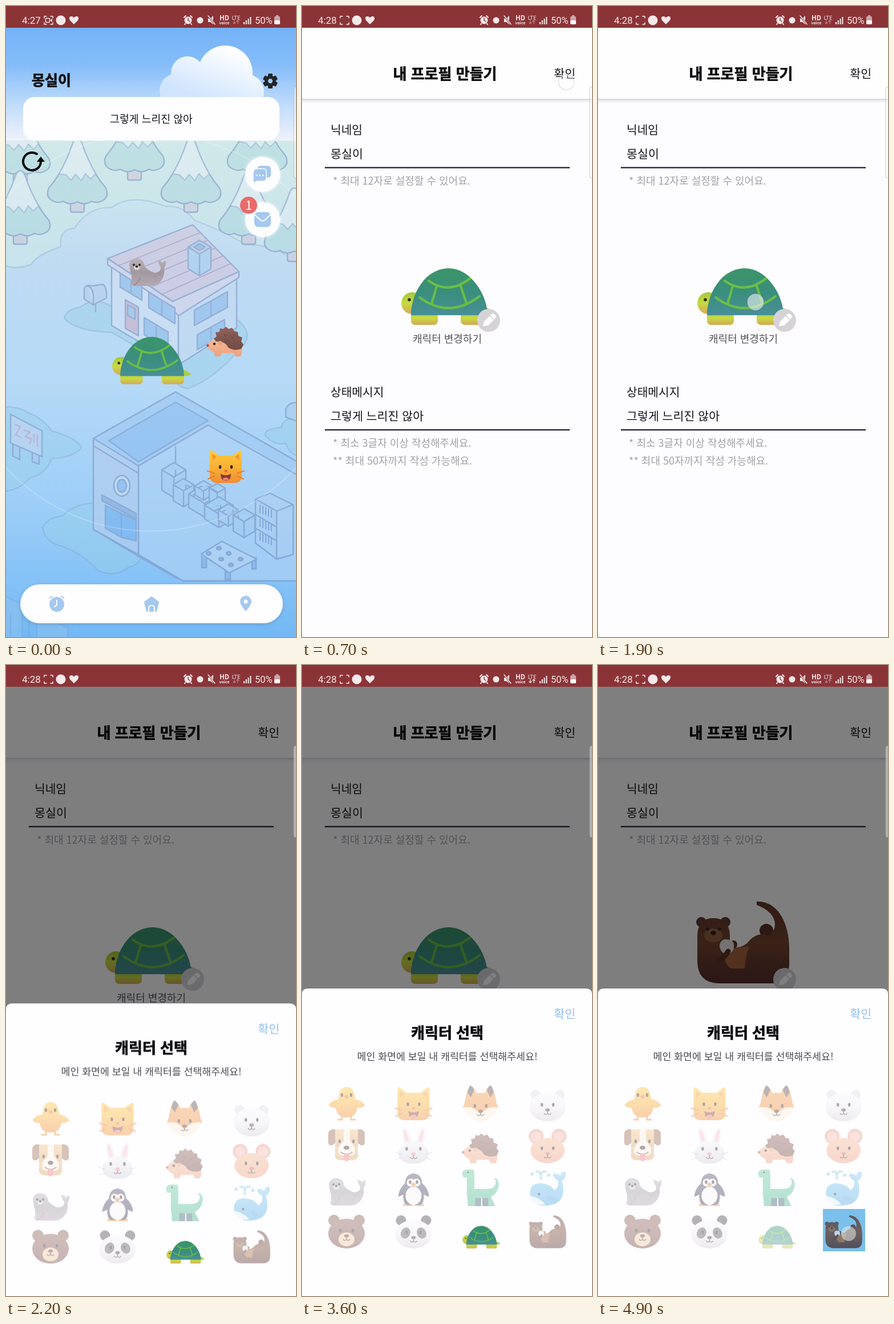
These frames come from a looping animation (508x1102 px, 5 s). An HTML page:

```html
<!DOCTYPE html>
<html lang="ko">
<head>
<meta charset="utf-8">
<style>
html,body{margin:0;width:100%;height:100%;overflow:hidden;background:#fdfcfe}
svg{display:block;width:508px;height:1102px;font-family:'Noto Sans CJK KR','Noto Sans CJK',sans-serif}
.step{animation:5s step-end infinite}
.home{animation-name:home}
.before{animation-name:before}
.after{animation-name:after}
.old{animation-name:old}
.new{animation-name:new}
.faded{animation-name:faded}
.net{animation-name:net}
.tap1{animation:tap1 5s linear infinite}
.tap2{animation:tap2 5s linear infinite}
.dim{animation:dim 5s linear infinite}
.sheet{animation:sheet 5s infinite}
@keyframes home{0%{opacity:1}14%,to{opacity:0}}
@keyframes before{0%{opacity:1}4%,to{opacity:0}}
@keyframes after{0%{opacity:0}4%,to{opacity:1}}
@keyframes old{0%{opacity:1}98%,to{opacity:0}}
@keyframes new{0%{opacity:0}98%,to{opacity:1}}
@keyframes faded{0%{opacity:1}98%,to{opacity:.4}}
@keyframes net{0%{opacity:.4}68%{opacity:1}76%,to{opacity:.4}}
@keyframes tap1{0%,9%{opacity:0}10%,12%{opacity:1}14%{opacity:.6}16%,to{opacity:0}}
@keyframes tap2{0%,35%{opacity:0}36%,38%{opacity:1}42%,to{opacity:0}}
@keyframes dim{0%,41%{opacity:0}44%,to{opacity:1}}
@keyframes sheet{0%,41%{transform:translateY(540px);animation-timing-function:cubic-bezier(.2,.7,.3,1)}46%,to{transform:none}}
</style>
</head>
<body>
<svg id="stage" viewBox="0 0 508 1102"></svg>
<script>
const path = (d, fill = 'none', more = '') => `<path d="${d}" fill="${fill}" ${more}/>`;
const oval = (x, y, rx, ry, fill, more = '') => `<ellipse cx="${x}" cy="${y}" rx="${rx}" ry="${ry}" fill="${fill}" ${more}/>`;
const dot = (x, y, r, fill, more) => oval(x, y, r, r, fill, more);
const box = (x, y, w, h, fill, r = 0, more = '') => `<rect x="${x}" y="${y}" width="${w}" height="${h}" rx="${r}" fill="${fill}" ${more}/>`;
const line = (d, color, w = 2, more = '') => path(d, 'none', `stroke="${color}" stroke-width="${w}" stroke-linecap="round" stroke-linejoin="round" ${more}`);
const group = (cls, body, more = '') => `<g class="${cls}" ${more}>${body}</g>`;
const use = (id, x, y, s = 1, more = '') => `<use href="#art-${id}" transform="translate(${x} ${y}) scale(${s})" ${more}/>`;
// y is the optical middle of the line; the heaviest weight gets a thin outline
const text = (x, y, size, weight, fill, str, anchor = 'start', more = '') =>
  `<text x="${x}" y="${y + size * .37}" font-size="${size}" font-weight="${weight}" fill="${fill}" text-anchor="${anchor}" ${weight === 900 ? `stroke="${fill}" stroke-width=".7"` : ''} ${more}>${str}</text>`;
const shade = (id, ...colors) => `<linearGradient id="${id}" x2="0" y2="1">${colors.map((c, i) =>
  `<stop offset="${i / (colors.length - 1)}" stop-color="${c}"/>`).join('')}</linearGradient>`;

const nick = '몽실이', motto = '그렇게 느리진 않아';
const ink = '#33262a';
const eyes = (x, y, w) => oval(x - w, y, 2.2, 3.2, ink) + oval(x + w, y, 2.2, 3.2, ink);
const face = (x, y, w, nose = '#4b3534') => eyes(x, y, w) + oval(x, y + 9, 4, 2.8, nose) +
  line(`M${x} ${y + 11}v4m-6 0q3 4 6 0q3 4 6 0`, '#5a403d', 1.5);
const pair = (x, y, r, fill) => dot(32 - x, y, r, fill) + dot(32 + x, y, r, fill);

const art = {
  chick: path('M24 52v9h-8M40 52v9h8', 'none', 'stroke="#ef8d32" stroke-width="3"') +
    path('M18 25Q19 4 32 4Q46 4 47 25Q58 27 65 36Q57 42 51 40Q49 57 32 57Q15 57 13 40Q6 42 0 35Q7 27 18 25Z', 'url(#gold)') +
    eyes(32, 18, 8) + path('M27 21L32 17 37 21 32 25Z', '#ee7a35'),
  cat: path('M4 8Q4 3 9 6L20 14H44L55 6Q60 3 60 8V49Q60 62 46 62H18Q4 62 4 49Z', 'url(#gold)') +
    path('M8 11L16 16 9 23ZM56 11L48 16 55 23Z', '#f49532') + eyes(32, 34, 10) + dot(32, 41, 2.5, '#e9694a') +
    path('M23 46Q32 51 41 46Q41 58 32 58Q23 58 23 46Z', '#863a35') + oval(32, 55, 5, 2.6, '#f27a70') +
    line('M12 45L0 41M12 50L1 55M52 45L64 41M52 50L63 55', '#e58231', 2),
  fox: path('M4 32Q8 8 14 1Q20 3 25 15Q32 13 39 15Q44 3 50 1Q56 8 60 32L63 40Q48 63 32 64Q16 63 1 40Z', 'url(#rust)') +
    path('M9 14Q11 5 14 1Q18 3 21 9L15 22ZM55 14Q53 5 50 1Q46 3 43 9L49 22Z', '#554849') +
    path('M1 40Q21 36 32 53Q43 36 63 40Q49 65 32 64Q15 65 1 40Z', '#fff0de') + face(32, 37, 10),
  polar: pair(21, 18, 9, '#dedde2') + oval(32, 39, 32, 25, 'url(#white)') + face(32, 35, 10),
  dog: path('M12 12H52V46Q54 57 42 58H22Q10 57 12 46Z', 'url(#tan)') +
    path('M13 4Q2 2 0 11V28Q3 36 12 28L22 4ZM51 4Q62 2 64 11V28Q61 36 52 28L42 4Z', '#9b6b50') +
    path('M12 4H52V34H12Z', 'url(#tan)') +
    path('M27 4H38V25Q49 33 46 47Q32 55 18 47Q15 33 27 25Z', '#fff3e5') + eyes(32, 25, 12) +
    oval(32, 36, 5, 3.5, ink) + line('M22 44q10 7 20 0', '#81564a') + path('M27 47h10v9q-5 8-10 0Z', '#ee7f86'),
  rabbit: path('M16 31Q6 2 16 0Q24 1 28 25H36Q40 1 48 0Q58 2 48 31Q59 36 59 48Q55 64 32 64Q9 64 5 48Q5 36 16 31Z', 'url(#white)') +
    path('M18 26Q11 5 16 4Q21 6 24 25ZM46 26Q53 5 48 4Q43 6 40 25Z', '#f5c4ca') + face(32, 38, 12, '#ec8b94') +
    line('M11 48L0 44M12 53L1 57M53 48L64 44M52 53L63 57', '#c4c0c7', 1.3),
  hedgehog: path('M0 43Q12 29 21 32Q31 43 60 45Q63 56 59 63H50L47 57H26L23 63H14L12 55Q3 53 0 43Z', 'url(#peach)') +
    path('M16 37L12 32 17 28 15 21 22 20 23 14 29 15 33 11 38 15 44 13 48 19 54 20 55 27 62 30 60 37 64 42 60 50Q46 54 37 47Q32 36 16 37Z', 'url(#brown)') +
    line('M30 24l3 4 4-4M41 26l4 5 4-5M30 34l4 4 4-5M45 39l4 4 5-5', '#704b44', 1.4) +
    dot(13, 41, 2.3, ink) + dot(1.5, 44, 2.3, '#a55744') + dot(23, 40, 4, '#e7a580'),
  mouse: pair(20, 16, 13, '#e9a183') + pair(20, 17, 9, '#f4bbb0') + oval(32, 41, 30, 22, 'url(#peach)') + face(32, 37, 10, '#d86673'),
  seal: path('M1 27Q2 15 14 15Q26 15 28 29Q36 38 46 40Q57 39 56 30Q51 23 51 18Q57 18 59 23Q61 19 65 19Q66 27 62 32Q64 47 54 57Q48 63 36 63H14Q0 63 5 55Q6 45 3 38Z', 'url(#gray)') +
    dot(9, 26, 2, ink) + dot(19, 26, 2, ink) + oval(14, 31, 5, 4, '#ddd7d5') + oval(14, 29, 2.5, 2, ink) +
    line('M9 62Q16 58 20 49', '#8d8589', 1.5) + oval(46, 46, 3, 2, '#a09599') + oval(53, 42, 2, 2, '#a09599'),
  penguin: path('M16 58Q21 55 31 61V64H13ZM48 58Q43 55 33 61V64H51Z', '#f29a3a') +
    path('M32 7Q46 8 47 24Q59 34 59 48L50 44Q51 58 44 62H20Q13 58 14 44L5 48Q6 34 17 24Q18 8 32 7Z', 'url(#navy)') +
    oval(32, 46, 14, 16, '#faf6f7') + dot(27, 23, 7, '#faf6f7') + dot(37, 23, 7, '#faf6f7') + eyes(32, 22, 6) + path('M27 26L32 22 37 26 32 30Z', '#f08b36'),
  dino: path('M22 50h11v14H22ZM35 50h11v14H35Z', '#3f6075') +
    path('M0 6Q1 0 9 0H17Q21 0 21 5V34H43Q55 34 58 26Q60 19 55 15Q64 15 64 27Q62 42 50 48L58 64H46V50H22V64H10Q9 50 8 42V14H3Q0 14 0 6Z', 'url(#mint)') + dot(10, 5, 1.7, ink),
  whale: path('M1 40Q2 24 20 24Q36 25 44 36Q51 33 51 20Q40 14 42 8Q50 6 54 11Q57 3 63 4Q66 14 57 20Q64 44 52 56Q42 64 20 63Q1 58 1 40Z', 'url(#blue)') +
    path('M2 46Q18 49 28 61Q5 65 2 46Z', '#e6f1f8') + dot(17, 43, 2.2, ink) + path('M30 46q11-1 14 9q-9 3-14-9Z', '#56a4d8') +
    line('M20 17V9Q18 2 12 4M20 9Q22 2 29 4', '#7fc6ef', 3) + dot(5, 8, 3, '#8fcdf0') + dot(34, 10, 3, '#8fcdf0'),
  bear: pair(22, 15, 10, '#85604a') + oval(32, 38, 32, 26, 'url(#brown)') + oval(32, 48, 14, 12, '#f1ca9c') + face(32, 33, 11),
  panda: pair(22, 15, 9, '#4a4450') + oval(32, 39, 32, 25, 'url(#white)') +
    oval(18, 37, 8, 10, '#5b5562', 'transform="rotate(28 18 37)"') + oval(46, 37, 8, 10, '#5b5562', 'transform="rotate(-28 46 37)"') + face(32, 36, 12),
  turtle: path('M146 68L166 78Q165 83 148 83Z', '#a9cf38') + oval(19, 62, 19, 19, 'url(#lime)') + dot(14, 56, 2.8, ink) +
    box(17, 76, 47, 24, 'url(#lime)', 7) + box(104, 76, 47, 24, 'url(#lime)', 7) +
    path('M17 83V76Q21 40 44 17Q62 1 84 1Q110 2 130 27Q150 53 151 83Z', 'url(#shell)') +
    line('M48 23Q83 48 120 19M32 52Q84 90 137 50M62 32L53 63M104 32L114 62', '#69bd45', 4.2),
  otter: dot(8, 37, 9, '#633b32') + dot(50, 37, 9, '#633b32') + dot(122, 52, 12, '#5a3029') +
    path('M105 1C143 -1 162 42 162 82V112Q161 145 130 144H38Q0 143 1 102V60Q2 30 29 30Q57 30 58 60V82Q75 84 88 74Q105 52 125 61Q137 54 137 41Q136 19 105 7Z', 'url(#umber)') +
    path('M50 84Q70 80 92 80Q84 100 84 118H60Q45 110 50 84Z', '#a4643c') +
    oval(29, 60, 16, 12, '#95613f') + dot(19, 49, 2.8, ink) + dot(40, 49, 2.8, ink) + oval(29, 56, 5, 4, ink) +
    dot(64, 76, 7, '#613529') + path('M40 78Q41 68 50 67Q66 68 65 78Q66 91 52 93Q41 91 40 78Z', '#e8e4e6') +
    line('M40 103Q50 97 55 88', '#5a3129', 9),
  tree: box(-12, -18, 24, 18, '#cfcbd8', 3) +
    path('M0-128Q5-128 8-120Q24-72 50-42Q57-26 42-19Q33-15 25-19Q13-11 0-18Q-12-11-25-19Q-33-15-42-19Q-57-26-50-42Q-24-72-8-120Q-5-128 0-128Z', '#b3dbdd') +
    path('M0-128Q5-128 8-120Q17-93 32-67L23-58 14-67 7-55-3-66-11-56-20-65-32-67Q-17-93-8-120Q-5-128 0-128Z', '#e2eef2', 'stroke-opacity=".6"'),
};

const town = () => {
  const trees = [[25, 308], [225, 304], [440, 304], [125, 360], [324, 360], [25, 416], [425, 416], [505, 446]];
  const pane = (x, y, w, h, slope) => path(`M${x} ${y}l${w} ${w * slope}v${h}l${-w} ${-w * slope}ZM${x + w / 2} ${y + w / 2 * slope}v${h}`, '#8fbdec');
  const crate = (x, y, w, h) => path(`M${x} ${y}l${w * .5} ${-w * .3}l${w * .5} ${w * .3}v${h}l${-w * .5} ${w * .3}l${-w * .5} ${-w * .3}ZM${x} ${y}l${w * .5} ${w * .3}l${w * .5} ${-w * .3}M${x + w * .5} ${y + w * .3}v${h}`, '#a9cdef');
  const patch = d => path(d, '#98cfe7', 'fill-opacity=".7" stroke-opacity=".5"');
  const planks = [1, 2, 3, 4, 5].map(i => `M${178 + i * 19} ${441 + i * 12.5}L${327 + i * 13.5} ${382 + i * 13.5}`).join('');
  const books = [0, 1, 2].map(r => [0, 1, 2, 3, 4].map(c => `M${445 + c * 5} ${872 + r * 24 + c * 2}v13`).join('')).join('');
  return `<g stroke="#7f97c4" stroke-width="2.4" stroke-linejoin="round" stroke-linecap="round" opacity=".62">` +
    path('M-4 232H512V450Q470 415 420 417Q385 395 330 374Q310 347 280 350Q220 326 185 352Q145 350 120 388Q92 390 96 420Q50 437 45 451Q15 462-4 452Z', '#cde8e7', 'stroke-opacity=".45"') +
    trees.map(([x, y]) => use('tree', x, y)).join('') +
    patch('M102 545Q105 530 130 526Q155 506 185 525L405 548Q440 575 405 604Q365 650 320 668Q290 666 297 635L185 570Q120 568 102 545Z') +
    path('M185 452L302 525V627L185 558Z', '#d3e1f3') + path('M302 525L404 464V562L302 627Z', '#c6daf1') +
    path('M178 441L327 382 408 464 292 516Z', '#d3c6dc') + line(planks, '#a58fb6', 1.6) +
    path('M178 441V452L282 520 302 541 408 474V464L292 516Z', '#d8d3e8') +
    crate(319, 421, 40, 38) + path('M329 421l10-6 10 6-10 6Z', '#8cb3dc') +
    path('M209 513l23 13v50l-23-13Z', '#cbb0c4') + path('M213 522l13 7v18l-13-7Z', '#9dc2ea') +
    pane(200, 467, 38, 24, .6) + pane(250, 500, 46, 27, .6) + pane(242, 544, 42, 30, .6) + pane(330, 531, 58, 27, -.55) + pane(335, 574, 48, 26, -.55) +
    path('M137 494Q140 485 150 489L170 486Q177 492 176 510L153 522 137 512ZM153 522V505Q151 491 143 489M157 521V534', '#b7cdea') +
    patch('M-4 700Q25 700 38 710Q65 720 80 742Q128 756 132 772Q115 790 80 790Q70 818 42 824Q25 845-4 848Z') +
    path('M12 764v22l12 6v-22M46 778v18l12 4v-18', '#a5c8ec') + path('M8 713L63 742V787L8 763Z', '#bdd3ee') + line('M16 731l9 4-8 14 10 5M32 741l10 3-8 8 10 4-2 8M49 748v14M55 750v18', '#c7a3c0', 2.5) +
    patch('M512 722Q485 718 482 736Q452 738 454 750Q470 768 490 764Q496 782 512 786Z') + path('M490 704q7-15 22-10v32l-22-8Z', '#a7cbef') +
    patch('M64 912Q70 894 100 890Q120 868 160 868L235 940Q245 974 215 980Q190 1000 160 985Q140 960 100 944Q70 938 64 912Z') +
    path('M153 755L297 674 512 797V1000H300L230 960 153 914Z', '#a0c9f3') + path('M180 759L297 692 354 724 232 796Z', '#8dbcf0') +
    path('M232 803L354 732 512 820V1004H310L232 958Z', '#b0d2f4') + path('M153 755L232 803V958L153 914Z', '#b6cdeb') + path('M153 768L232 816M297 770V826L340 850M153 755L297 674 512 797M232 803L354 732') +
    oval(203, 838, 14, 18, '#d2dff1') + oval(203, 838, 8, 11, '#8ebced') + path('M168 854L228 886V896L168 864Z', '#8caad8') + path('M174 872L202 886V928L174 912ZM202 886L228 898V934L202 928', '#75b2ee') +
    crate(273, 810, 42, 36) + crate(293, 836, 36, 28) + crate(320, 852, 56, 24) + crate(331, 838, 30, 16) + crate(356, 842, 28, 22) + crate(348, 872, 50, 24) + crate(372, 880, 35, 18) + crate(398, 889, 38, 28) +
    path('M437 861L463 851 503 871V958L474 966 437 938ZM437 861L474 882V966M474 882L503 871M437 888l37 22M437 912l37 22', '#b5d1ef') + line(books, '#7293cc', 2) +
    path('M343 961v20h8v-15M384 982v20h9v-18M431 965v18h7v-20', '#8db6e5') + path('M342 957L378 935 439 966 391 990Z', '#c0d8f1') +
    [[355, 956], [373, 947], [390, 956], [377, 966], [394, 976], [411, 966]].map(([x, y]) => oval(x, y, 4, 3, '#84a9dd')).join('') +
    path('M-4 1030l32 14v66H-4ZM54 1060l54 26v30H54ZM8 1062v40M40 1050v60', '#8cc1ef', 'stroke-opacity=".5"') + '</g>' +
    dot(254, 570, 347, 'none', 'stroke="#fff" stroke-opacity=".22" stroke-width="2"');
};

const gear = [...Array(6)].map((_, i) => box(-4, -13, 8, 9, '#242329', 1.5, `transform="rotate(${i * 60})"`)).join('') +
  dot(0, 0, 7, 'none', 'stroke="#242329" stroke-width="5.5"');
const tint = '#a5c8ef';
const button = y => dot(449.5, y, 30.5, '#fdfdff', 'filter="url(#glow)"');

const home = box(0, 38, 508, 200, 'url(#sky)') +
  `<g fill="url(#cloud)" clip-path="url(#cut)">${[[299, 148, 30], [318, 117, 29], [384, 117, 48], [421, 150, 31], [355, 148, 45]].map(([x, y, r]) => `<circle cx="${x}" cy="${y}" r="${r}"/>`).join('')}</g>` +
  box(0, 235, 508, 867, 'url(#ground)') + `<g clip-path="url(#below)">${town()}</g>` +
  text(45, 130, 25, 900, '#111', nick) + `<g transform="translate(463 131)">${gear}</g>` +
  box(30, 159, 449, 76, '#fefdff', 20) + text(254.5, 197, 18.3, 500, '#161519', motto, 'middle') +
  line('M61 272A15.5 15.5 0 1 1 54 258.5', '#050505', 4) + path('M54 272L61 263 68 272Z', '#050505') +
  button(294) + button(373) +
  box(440, 279, 24, 21, tint, 6) + path('M440 284h11q5 0 5 6v10q0 6-6 6h-10l-7 3v-18q0-7 7-7Z', tint, 'stroke="#fdfdff" stroke-width="1.5"') +
  [439, 444.5, 450].map(x => dot(x, 296, 1.4, '#fff')).join('') +
  box(435, 360, 29, 26, tint, 7) + line('M436 365L446 374Q449.5 377 453 374L463 365', '#fdfdff', 2) +
  dot(425, 348, 15, '#ea6b69') + text(425, 348, 22, 300, '#fff', '1', 'middle') +
  use('seal', 215, 426) + use('hedgehog', 352, 549) + use('turtle', 186, 577, .834) + use('cat', 353, 771) +
  box(25, 1010, 460, 68, '#fefdff', 34, 'filter="url(#soft)"') +
  dot(89, 1045, 13, tint) + line('M89 1038v8l-4 3', '#fff', 2) + line('M77 1034l4-3M101 1034l-4-3', tint, 2) +
  path('M255 1032L267 1041 263 1057H247L243 1041Z', tint, `stroke="${tint}" stroke-width="2" stroke-linejoin="round"`) + path('M250 1058v-6q0-5 5-5t5 5v6', 'none', 'stroke="#fff" stroke-width="2"') +
  path('M420 1057Q410 1046 410 1040A10 10 0 0 1 430 1040Q430 1046 420 1057Z', tint) + dot(420, 1040, 3.5, '#fff');

const field = (y, label, value) => text(50, y, 20.3, 500, '#151419', label) + text(50, y + 42, 20.6, 500, '#151419', value) + box(40, y + 65, 429, 2.5, '#353449');
const hint = (y, str) => text(54, y, 18, 300, '#a3a1a7', str);
const profile = box(0, 38, 508, 1064, '#fdfcfe') + box(-10, 38, 528, 124, '#fffeff', 0, 'filter="url(#soft)"') +
  text(250.5, 118, 26, 900, '#08080a', '내 프로필 만들기', 'middle') + text(479, 118, 20.5, 500, '#151419', '확인', 'end') +
  field(216, '닉네임', nick) + hint(305, '* 최대 12자로 설정할 수 있어요.') +
  group('step old', use('turtle', 174, 457)) + group('step new', use('otter', 173, 412)) +
  dot(327, 549, 20, '#d5d3d6') + path('M317 559l2-8 13-13q3-2 6 1t1 6l-13 13Z', '#fff') + line('M329 541l7 7', '#d5d3d6', 1.5) +
  text(254.5, 581, 18, 300, '#555358', '캐릭터 변경하기', 'middle') +
  field(674, '상태메시지', motto) + hint(763, '* 최소 3글자 이상 작성해주세요.') + hint(794, '** 최대 50자까지 작성 가능해요.');

const order = ['chick', 'cat', 'fox', 'polar', 'dog', 'rabbit', 'hedgehog', 'mouse', 'seal', 'penguin', 'dino', 'whale', 'bear', 'panda'];
const grid = order.map((id, i) => use(id, 46 + i % 4 * 117.4, 733 + (i >> 2) * 74, 1, 'opacity=".4"')).join('') +
  group('step faded', use('turtle', 281, 979, .4)) +
  group('step old', use('otter', 398, 961, .4, 'opacity=".4"')) +
  group('step new', box(394, 950, 74, 74, '#8ac9f1') + use('otter', 398, 961, .4) +
    box(394, 950, 74, 74, '#4fa8dc', 0, 'opacity=".28"') + dot(439, 993, 13, '#e9e6e4', 'opacity=".55"'));
const sheet = path('M0 1110V575Q0 565 10 565H498Q508 565 508 575V1110Z', '#fefdff') +
  text(479, 609, 20.5, 500, '#8fbff0', '확인', 'end') + text(254.5, 642, 26, 900, '#08080a', '캐릭터 선택', 'middle') +
  text(254.5, 684, 17.3, 300, '#4c4a4f', '메인 화면에 보일 내 캐릭터를 선택해주세요!', 'middle') + grid;

const pale = '#f6e9ea';
const label = (x, size, str) => text(x, 25, size, 400, pale, str, 'start', 'font-family="Roboto, sans-serif"');
const status = box(0, 0, 508, 38, '#8b3438') + group('step before', label(28, 17, '4:27')) + group('step after', label(28, 17, '4:28')) +
  line('M67 21v-3h4M78 18h4v3M82 29v3h-4M71 32h-4v-3', pale, 1.5) +
  group('step home', box(69.5, 21.5, 7, 7, 'none', 1, `stroke="${pale}" stroke-width="1.4"`) + path('M77 25l4-3v6Z', pale)) +
  dot(96, 25, 8.5, pale) + path('M119 32L112 25Q109 19 114 18Q118 18 119 21Q120 18 124 18Q129 19 126 25Z', pale) +
  dot(319, 25, 6.5, pale) + line('M312 20l3-3M326 20l-3-3M314 31l-1 1M324 31l1 1', pale, 2) + line('M319 21v4l3 2', '#8b3438', 1.4) +
  dot(340, 25, 5.5, pale) +
  path('M354 22h4l5-5v15l-5-4h-4Z', pale) + line('M354 17l12 15', '#8b3438', 3.5) + line('M354 17l12 15', pale, 1.5) +
  text(382.5, 21, 11.5, 700, pale, 'HD', 'middle') + text(382.5, 29, 7, 700, pale, 'voice', 'middle') + text(403, 20, 9.5, 500, pale, 'LTE', 'middle') +
  group('step net', line('M400 25v6l-2-2m2 2l2-2M406 31v-6l-2 2m2-2l2 2', pale, 1.3)) +
  [0, 1, 2, 3].map(i => box(416 + i * 3.8, 28 - i * 3, 2, 4 + i * 3, pale)).join('') +
  label(436, 16.5, '50%') + box(473, 16, 4, 3, '#caa4a6') + box(470, 18, 10, 14, '#caa4a6', 2) + box(470, 25, 10, 7, '#fff8f8', 2);

const tap = (cls, x, y) => group(cls, dot(x, y, 13.5, '#fff', 'fill-opacity=".55" stroke="#c9c9e6" stroke-opacity=".75" stroke-width="2"'));
const shadow = (id, dy, blur, color, alpha) => `<filter id="${id}" x="-20%" y="-20%" width="140%" height="140%"><feDropShadow dx="0" dy="${dy}" stdDeviation="${blur}" flood-color="${color}" flood-opacity="${alpha}"/></filter>`;

const defs = shade('gold', '#fdc93e', '#fbb234', '#f08d34') + shade('rust', '#f5a04b', '#ee8a3c') + shade('white', '#f8f7f9', '#eeedf1', '#d3d0d8') +
  shade('tan', '#f3c787', '#dda870') + shade('peach', '#f4bd94', '#ef9f7f') + shade('brown', '#90625a', '#734a45') + shade('gray', '#b9b4b7', '#a0999f', '#b5a8b3') +
  shade('navy', '#57526a', '#383653') + shade('mint', '#68cda2', '#47b78d') + shade('blue', '#82ccf3', '#52abe2') + shade('lime', '#a2c83a', '#c7da42', '#d7a657') +
  shade('shell', '#3b9569', '#398e7c', '#488f97') + shade('umber', '#633528', '#75452f', '#542c2b') +
  shade('sky', '#74b3f8', '#86bdf9', '#bfdbfb', '#f2f3fc') + shade('ground', '#d5ebee', '#bfdbf2', '#b4d9f7', '#9bcdf8', '#72b8f5') +
  `<linearGradient id="cloud" gradientUnits="userSpaceOnUse" x1="385" y1="70" x2="350" y2="165"><stop stop-color="#fff"/><stop offset="1" stop-color="#cfe4fd"/></linearGradient>` +
  '<clipPath id="cut"><path d="M260 60H460V160H260Z"/></clipPath><clipPath id="below"><path d="M0 236H508V1102H0Z"/></clipPath>' +
  shadow('soft', 2, 3, '#4a5578', .3) + shadow('glow', 0, 3, '#fff', .8) +
  Object.entries(art).map(([id, body]) => `<g id="art-${id}">${body}</g>`).join('');

document.getElementById('stage').innerHTML = `<defs>${defs}</defs>` + profile + tap('tap2', 276, 517) +
  group('dim', box(0, 38, 508, 1064, '#000', 0, 'opacity=".5"')) + group('sheet', sheet) +
  group('step home', home) + tap('tap1', 463, 133) + status +
  box(504, 141, 12, 160, '#fff', 4, 'fill-opacity=".4" stroke="#a9a7ae" stroke-opacity=".6"');
</script>
</body>
</html>
```
